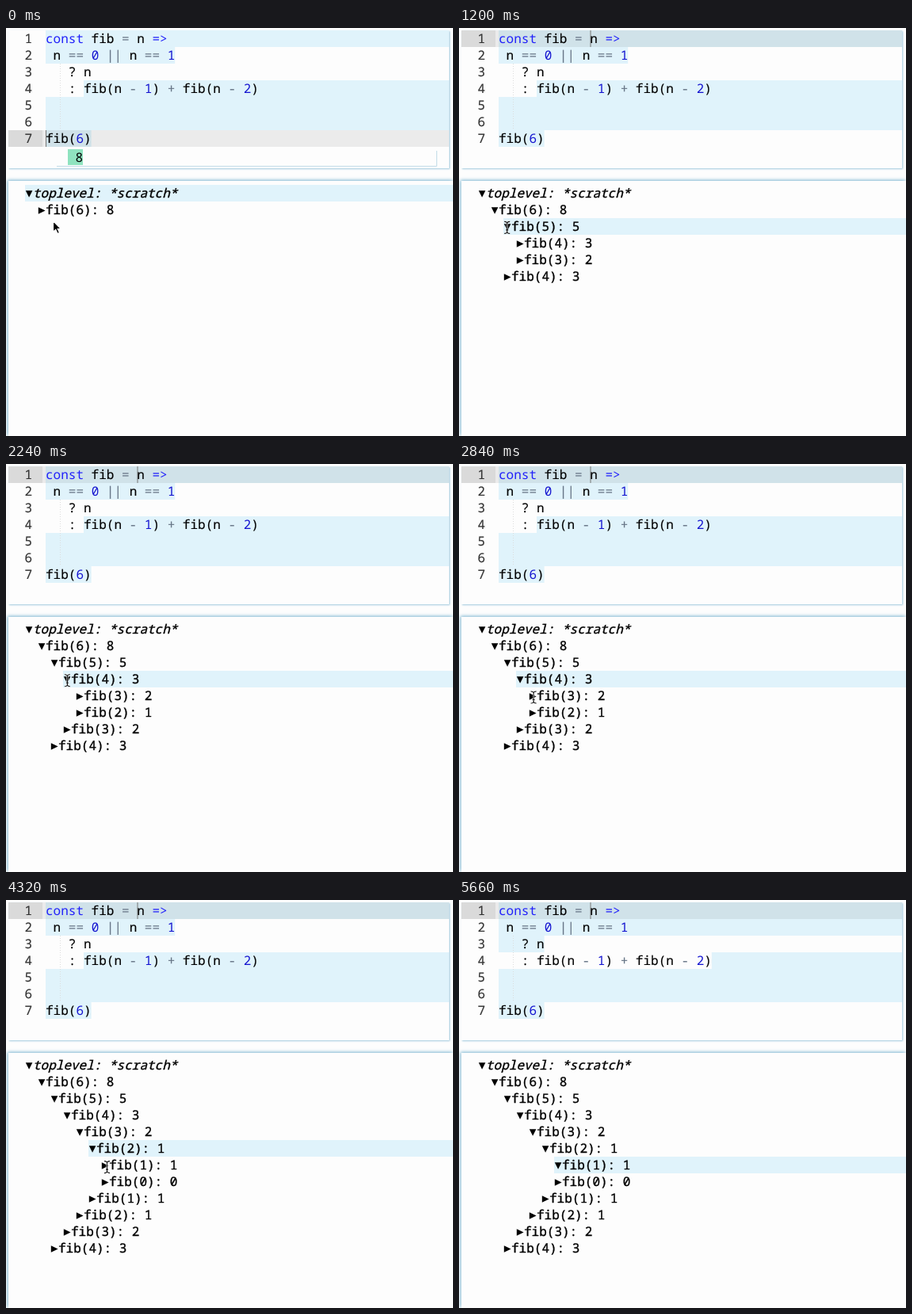
An HTML page that plays this animation: 564x515 px, repeating every 6260 ms.

```html
<!DOCTYPE html>
<html lang="en">
<head>
<meta charset="utf-8">
<title>Call tree explorer</title>
<style>
  html, body { margin: 0; width: 100%; height: 100%; overflow: hidden; background: #fdfdfd; }
  #stage { position: absolute; left: 0; top: 0; width: 564px; height: 515px; overflow: hidden; contain: strict; }
  .pane { position: absolute; background: #fdfdfd; }
  #editor { left: 3px; top: 3px; width: 556px; height: 174px; box-shadow: 1px 1px 2px #9fc8dc; }
  #tree { left: 3px; top: 193px; width: 561px; height: 322px; box-shadow: -1px -1px 4px #79b4d0; }
  svg { position: absolute; left: 0; top: 0; display: block; overflow: hidden; }
  text { font: 16px "Noto Sans Mono", "DejaVu Sans Mono", monospace; white-space: pre; text-rendering: geometricPrecision; }
  #code text { stroke: #000; stroke-width: .15px; }
  #calls text { stroke: #000; stroke-width: .35px; }
  #code .kw { fill: #2222fa; stroke: none; }
  #code .op { fill: #687687; stroke: #687687; }
  #code .num { fill: #1414d0; stroke: none; }
  #code .line { fill: #333; stroke: #333; }
  .top { font-style: italic; }
</style>
</head>
<body>
<div id="stage">
  <div class="pane" id="editor"></div>
  <div class="pane" id="tree"></div>
  <svg width="564" height="515" viewBox="0 0 564 515">
    <g id="marks"></g>
    <g id="code"></g>
    <g id="calls"></g>
    <path id="arrow" d="M.5.5V14.3L3.7 11.4L6 16.6L8.5 15.5L6.2 10.5H10.3Z" stroke="#fff" stroke-width="1.2"/>
    <g id="beam" fill="none">
      <path stroke="#fff" stroke-width="2.4" stroke-opacity=".8"/>
      <path stroke="#111" stroke-width="1.1"/>
    </g>
  </svg>
</div>
<script>
const LOOP = 6260, TICK = 148.9, HIDE = 38;
const ROW = 21, CH = 9.6, LEFT = 50, RIGHT = 559, BLUE = '#e0f3fb';
const $ = id => document.getElementById(id);

// Pointer trips in ticks: each one ends on a triangle, which is then clicked.
const trips = [
  { from: 0, to: 2, click: 2 }, { from: 3, to: 6, click: 8 },
  { from: 8, to: 13, click: 15 }, { from: 15, to: 19, click: 20 },
  { from: 20, to: 23, click: 24 }, { from: 26, to: 29, click: 30 }
];

const source = [
  'const fib = n =>',
  ' n == 0 || n == 1',
  '   ? n',
  '   : fib(n - 1) + fib(n - 2)',
  '', '',
  'fib(6)'
];

const col = n => LEFT + n * CH;
const codeY = line => 3 + (line - 1) * ROW;
const rect = (x, y, x2, h, fill) =>
  `<rect x="${x}" y="${y}" width="${x2 - x}" height="${h}" fill="${fill}"/>`;
const label = (x, y, body, cls = '') => `<text x="${x}" y="${y + 16}" class="${cls}">${body}</text>`;

function paint(line) {
  return line.replace(/const|=>|==|\|\||[=+-]|\d/g, t => {
    const cls = /const|=>/.test(t) ? 'kw' : /\d/.test(t) ? 'num' : 'op';
    return `<tspan class="${cls}">${t.replace('>', '&gt;')}</tspan>`;
  });
}

function drawCode() {
  $('code').innerHTML = source.map((s, i) =>
    label(23.4, codeY(i + 1), i + 1, 'line') + label(LEFT, codeY(i + 1), paint(s))
  ).join('') + '<path d="M68.5 45V129" stroke="#dcdcdc" stroke-dasharray="1 2"/>';
}

function drawMarks(open) {
  // Evaluated code is tinted; the branch not taken stays white.
  const last = source.length;
  const skip = open === trips.length ? [3, 6, 4, 28] : [2, 17, 4, 5];
  let out = '';
  for (let line = 1; line <= last; line++) {
    const [l1, c1, l2, c2] = skip;
    if (line > l1 && line < l2) continue;
    const from = line === l2 ? col(c2) : LEFT;
    const to = line === l1 ? col(c1) : line === last ? col(6) : RIGHT;
    out += rect(from, codeY(line), to, ROW, BLUE);
  }

  const y = codeY(open ? 1 : last), caret = open ? 165.5 : LEFT;
  out += rect(3, y, 46, ROW, '#dadada') + rect(46, y, RIGHT, ROW, 'rgba(0,0,0,.07)') +
    rect(caret, y, caret + 1, ROW, '#777');
  if (!open) {
    out += '<path d="M64 174.5H543.5V155" fill="none" stroke="#c3dce8"/>' +
      rect(78, 153, 97, 20, '#8fe3bf') + label(87.5, 153, 8);
  }
  $('marks').innerHTML = out;
}

const fib = n => n < 2 ? n : fib(n - 1) + fib(n - 2);

function drawCalls(open) {
  const rows = [{ level: 0, text: 'toplevel: *scratch*', opened: true }];
  (function visit(n, level, first) {
    const opened = first && level <= open;
    rows.push({ level, opened, text: `fib(${n}): ${fib(n)}` });
    if (opened && n > 1) {
      visit(n - 1, level + 1, true);
      visit(n - 2, level + 1, false);
    }
  })(6, 1, true);

  $('calls').innerHTML = rows.map(({ level, opened, text }, i) => {
    const x = 24 + level * 16, y = 198 + i * ROW;
    const shape = opened ? 'h8.6l-4.3 8.4z' : 'v8.4l8.8 -4.2z';
    return (i === open ? rect(x, y, 564, ROW, BLUE) : '') +
      `<path d="M${x + .8} ${y + 7.3}${shape}"/>` +
      label(x + 10, y, text, level ? '' : 'top');
  }).join('');
}

const ease = p => p * p * (3 - 2 * p);
const stop = i => i < 0 ? [59, 243] : [44 + 16.7 * i, 230.6 + 21.3 * i];

function pointer(tick) {
  const i = Math.max(0, trips.findLastIndex(trip => tick >= trip.from));
  const { from, to } = trips[i];
  const p = ease(Math.min(1, (tick - from) / (to - from)));
  const a = stop(i - 1), b = stop(i);
  return a.map((v, k) => v + (b[k] - v) * p);
}

function place(el, [x, y], visible) {
  el.style.display = visible ? '' : 'none';
  el.setAttribute('transform', `translate(${x} ${y})`);
}

const beamPath = 'M-3.5 -7.5Q0 -7.5 0 -5Q0 -7.5 3.5 -7.5M0 -5V5M-3.5 7.5Q0 7.5 0 5Q0 7.5 3.5 7.5M-1.5 3H1.5';
for (const path of $('beam').children) path.setAttribute('d', beamPath);
drawCode();

let shownOpen = -1;
function show(t) {
  const tick = Math.floor(t / TICK);
  const open = trips.filter(trip => tick >= trip.click).length;
  if (open !== shownOpen) {
    shownOpen = open;
    drawMarks(open);
    drawCalls(open);
  }
  const at = pointer(tick);
  place($('arrow'), at, tick === 0);
  place($('beam'), at, tick > 0 && tick < HIDE);
}

const start = performance.now();
function loop() {
  show((performance.now() - start) % LOOP);
  requestAnimationFrame(loop);
}
loop();
</script>
</body>
</html>
```
